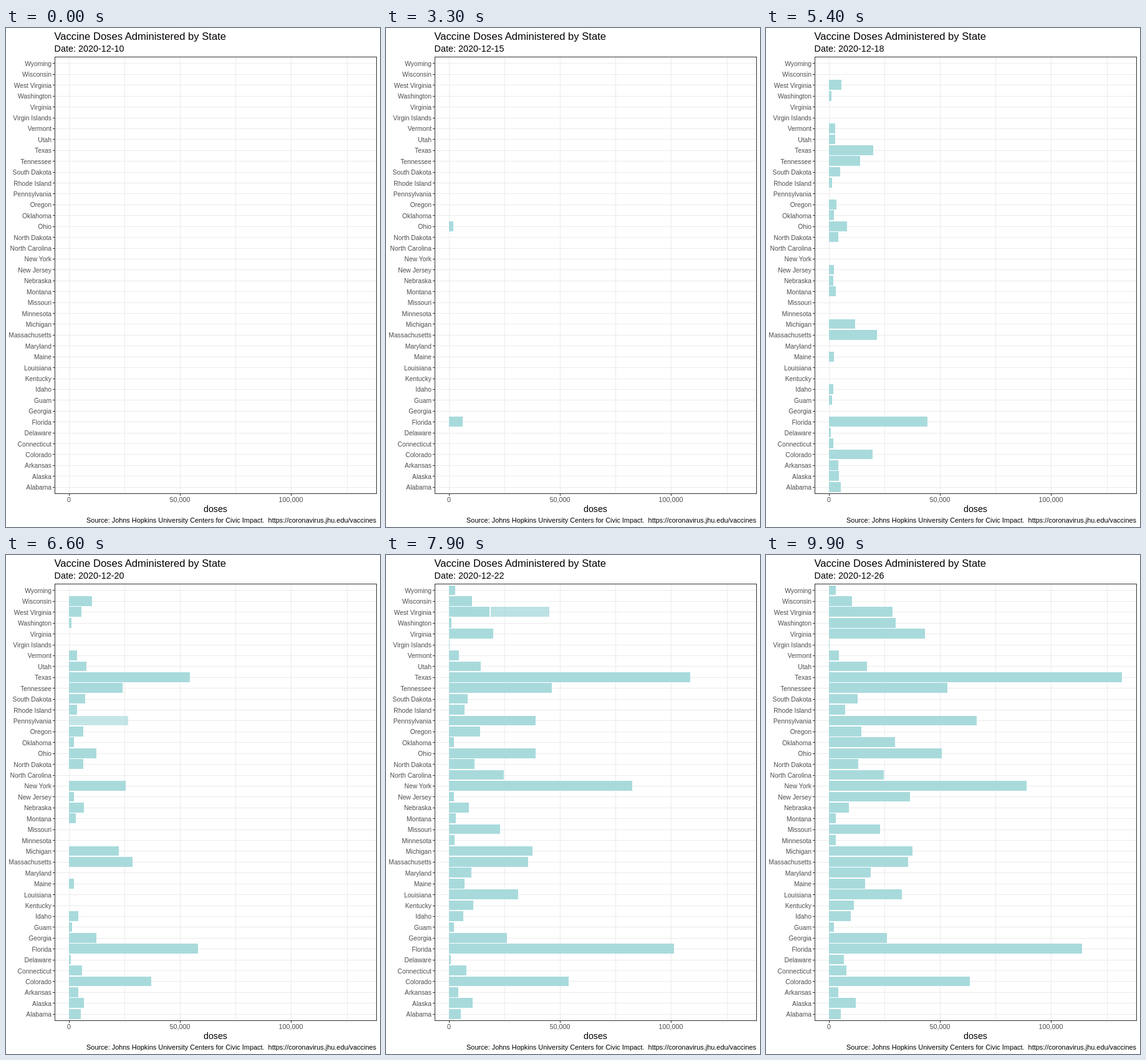
These frames come from a looping animation (600x800 px, 10 s). An HTML page:

```html
<!DOCTYPE html>
<html lang="en">
<head>
<meta charset="utf-8">
<title>Vaccine Doses Administered by State</title>
<style>
  html, body { margin: 0; width: 100%; height: 100%; overflow: hidden; background: #fff; }
  svg { display: block; width: 600px; height: 800px; font-family: "Liberation Sans", Arial, sans-serif; }
  rect { shape-rendering: crispEdges; }
  .grid { fill: #ebebeb; }
  .tick { fill: #333; }
  .bar { fill: #a8dadc; }
  .frame { fill: none; stroke: #333; }
  .label { fill: #4d4d4d; font-size: 10.3px; text-anchor: end; }
  .num { fill: #4d4d4d; font-size: 10.8px; text-anchor: middle; }
</style>
</head>
<body>
<svg id="chart" viewBox="0 0 600 800">
  <text x="77.5" y="19" font-size="16.6">Vaccine Doses Administered by State</text>
  <text id="date" x="77.5" y="38" font-size="14.4"></text>
  <g id="plot"></g>
  <rect class="frame" x="78.5" y="46.5" width="516" height="700"></rect>
  <text x="336" y="776" font-size="14.2" text-anchor="middle">doses</text>
  <text x="594" y="793" font-size="10.91" text-anchor="end" xml:space="preserve">Source: Johns Hopkins University Centers for Civic Impact.  https://coronavirus.jhu.edu/vaccines</text>
</svg>
<script>
const LOOP = 10000, STEP = 100, DAYS = 16, LAST = LOOP / STEP - 1;
const ZERO = 101, GAP = 89.1, TOP = 56.48, ROW = 17.415;

// Days at which the bar ends are known, and the day a bar is fully faded in
const KNOTS = [7, 8.73, 10.67, 12.77, 15];
const ENTRY = [7, 8, 10, 12];

// Name, index of the first knot, then bar ends in px; the last one holds.
// Irregular states give [day, end] pairs instead.
const STATES = [
  ["Wyoming", 3, 111, 112],
  ["Wisconsin", 2, 138],
  ["West Virginia", [7, 108], [8.73, 121], [11, 121], [12, 159], [13, 168], [14, 203]],
  ["Washington", [7, 105], [13, 105], [14, 208]],
  ["Virginia", 3, 172, 255],
  ["Virgin Islands", 3, 102],
  ["Vermont", 0, 106, 111, 114, 117],
  ["Utah", 0, 103, 111, 129, 152, 162],
  ["Texas", [7, 116], [8.73, 172], [10, 232], [11, 326], [12, 418], [13, 509], [14, 549], [15, 571]],
  ["Tennessee", 0, 107, 151, 187, 266, 291],
  ["South Dakota", 0, 107, 119, 127, 131, 147],
  ["Rhode Island", 1, 106, 114, 126, 127],
  ["Pennsylvania", [11, 196], [12.77, 240], [15, 338]],
  ["Oregon", 0, 104, 113, 124, 151, 153],
  ["Oklahoma", 1, 109, 109, 109, 207],
  ["Ohio", [4, 101], [7, 116], [8.73, 130], [10.67, 145], [12.77, 240], [15, 282]],
  ["North Dakota", 1, 116, 124, 142, 148],
  ["North Carolina", 3, 189],
  ["New York", 2, 192, 395, 418],
  ["New Jersey", [8, 109], [15, 109], [16, 231]],
  ["Nebraska", 0, 108, 108, 125, 133],
  ["Montana", 1, 112],
  ["Missouri", 3, 183],
  ["Minnesota", 3, 110, 112],
  ["Michigan", 0, 112, 143, 181, 235],
  ["Massachusetts", 0, 136, 178, 203, 228],
  ["Maryland", 3, 137, 168],
  ["Maine", 1, 109, 109, 126, 159],
  ["Louisiana", 3, 212, 218],
  ["Kentucky", 3, 140, 141],
  ["Idaho", 0, 103, 108, 116, 124, 136],
  ["Guam", 0, 103, 106, 106, 109],
  ["Georgia", 2, 145, 194],
  ["Florida", [4, 101], [5, 112], [6, 146], [7, 196], [8, 256], [9, 260], [10, 284], [11, 320], [12.77, 462], [15, 507]],
  ["Delaware", [8, 104], [13, 104], [14, 125]],
  ["Connecticut", 0, 108, 108, 122, 129],
  ["Colorado", 0, 145, 171, 233, 293, 327],
  ["Arkansas", 1, 116],
  ["Alaska", 1, 117, 125, 139, 144],
  ["Alabama", 1, 120]
];

const plot = document.getElementById("plot");
const dateText = document.getElementById("date");

function add(tag, attrs, text) {
  const el = document.createElementNS("http://www.w3.org/2000/svg", tag);
  for (const k in attrs) el.setAttribute(k, attrs[k]);
  if (text) el.textContent = text;
  return plot.appendChild(el);
}

const box = (cls, x, y, width, height) => add("rect", { class: cls, x, y, width, height });
const clamp = v => Math.max(0, Math.min(1, v));
const center = row => TOP + row * ROW;

function valueAt(points, day) {
  if (day <= points[0][0]) return points[0][1];
  for (let i = 1; i < points.length; i++) {
    const [d0, x0] = points[i - 1], [d1, x1] = points[i];
    if (day <= d1) return x0 + (x1 - x0) * (day - d0) / (d1 - d0);
  }
  return points[points.length - 1][1];
}

function addBar(row) {
  const y = Math.round(center(row) - ROW * 0.45);
  const end = Math.round(center(row) + ROW * 0.45);
  return box("bar", ZERO, y, 0, end - y);
}

function readRow([, first, ...rest]) {
  if (Array.isArray(first)) return { points: [first, ...rest], entry: first[0] };
  return { points: rest.map((x, i) => [KNOTS[first + i], x]), entry: ENTRY[first] };
}

// Grid, ticks and labels
for (let i = 0; i < 6; i++) {
  const x = Math.round(ZERO + GAP * i);
  box("grid", x, 47, 1, 699);
  if (i % 2 === 0) {
    box("tick", x, 747, 1, 3);
    add("text", { class: "num", x, y: 760 }, (i * 25000).toLocaleString("en-US"));
  }
}
STATES.forEach(([name], row) => {
  const y = Math.round(center(row));
  box("grid", 79, y, 515, 1);
  box("tick", 75, y, 3, 1);
  add("text", { class: "label", x: 73, y: Math.round(center(row) + 4.5) }, name);
});

const bars = STATES.map((state, row) => ({ ...readRow(state), el: addBar(row) }));

// A second entry stacked on West Virginia for one day
const extra = addBar(2);
extra.setAttribute("x", 168);
extra.setAttribute("width", 94);

function draw(now) {
  const day = Math.floor((now % LOOP) / STEP) * DAYS / LAST;
  dateText.textContent = "Date: 2020-12-" + (10 + Math.floor(day));
  for (const { points, entry, el } of bars) {
    el.setAttribute("width", Math.round(valueAt(points, day)) - ZERO);
    el.setAttribute("opacity", clamp(day - entry + 1));
  }
  extra.setAttribute("opacity", clamp(1 - Math.abs(day - 13)));
}

const start = performance.now();
function tick() {
  draw(performance.now() - start);
  requestAnimationFrame(tick);
}
tick();
</script>
</body>
</html>
```
